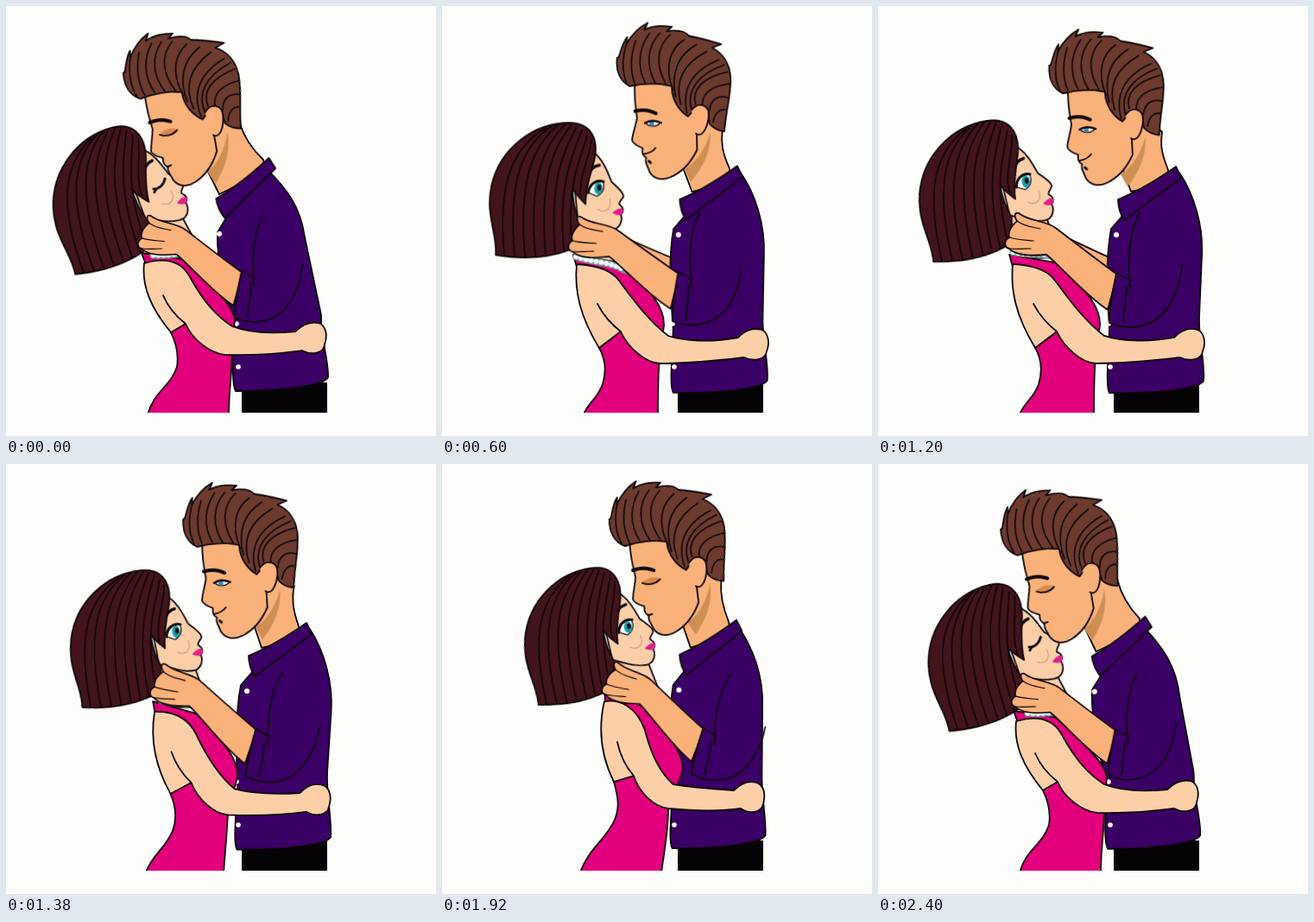
Animation of 498 by 498 pixels, one loop 2460 ms. Source, as an HTML page without scripts:

```html
<!DOCTYPE html>
<html lang="en">
<head>
<meta charset="utf-8">
<title>Kiss</title>
<style>
html, body { margin: 0; width: 100%; height: 100%; overflow: hidden; background: #fdfefc; }
svg { display: block; width: 100vw; height: 100vh; }
path { fill: none; stroke: #0c0508; stroke-width: 1.8; stroke-linejoin: round; stroke-linecap: round; }

.skin { fill: #fab17a; }
.fair { fill: #fccfa9; }
.purple { fill: #3b0066; }
.pink { fill: #e2007d; }
.brown { fill: #6c3a2f; }
.plum { fill: #42141b; }
.white { fill: #fff; }
.flat { stroke: none; }
.thin { stroke-width: 1.2; }
.strand { stroke-width: 1.6; }
.bold { stroke-width: 4; }

.him, .her, .arm, .neck, .collar, .shirt, .dress, .hug, .far, .awake, .asleep {
  animation: 2460ms linear infinite;
}
.him { animation-name: him; transform-origin: 302px 135px; }
.her { animation-name: her; transform-origin: 160px 220px; }
.arm { animation-name: arm; transform-origin: 271px 338px; }
.collar { animation-name: collar; transform-origin: 315px 210px; }
.neck { animation-name: neck; }
.shirt { animation-name: shirt; }
.dress { animation-name: dress; }
.hug { animation-name: hug; }
.far { animation-name: far; }
.him .awake { animation-name: his-awake; }
.him .asleep { animation-name: his-asleep; }
.her .awake { animation-name: her-awake; }
.her .asleep { animation-name: her-asleep; }
.awake, .asleep, .far { animation-timing-function: step-end; }

@keyframes him {
  0%, 100% { transform: translate(-61px, -2px) rotate(-10deg); }
  14.63% { transform: translate(-16px, -1px) rotate(-3deg); }
  21.95% { transform: translate(-5px, -4px) rotate(-1deg); }
  36.59% { transform: translate(0, 0); }
  48.78% { transform: translate(-6px, 2px) rotate(-3deg); }
  63.41% { transform: translate(9px, -10px) rotate(-4deg); }
  67% { transform: translate(8px, -13px) rotate(-4deg); }
  78.05% { transform: translate(-6px, -10px) rotate(-7deg); }
  97.56% { transform: translate(-55px, -3px) rotate(-9.5deg); }
}
@keyframes her {
  0%, 100% { transform: translate(0, 2px) rotate(-15deg); }
  14.63% { transform: translate(4px, 6px); }
  36.59% { transform: translate(0, 0); }
  45.12% { transform: translate(-18px, 0) rotate(-8deg); }
  48.78% { transform: translate(-6px, -2px) rotate(-8deg); }
  63.41% { transform: translate(45px, -22px) rotate(-4deg) scale(.97); }
  78.05% { transform: translate(39px, -17px) rotate(-8deg) scale(.97); }
  97.56% { transform: translate(4px, 2px) rotate(-14deg); }
}
@keyframes arm {
  0%, 100% { transform: translate(-3px, -4px) scale(.93); }
  14.63% { transform: translate(-3px, -2px) rotate(-3deg) scale(.96); }
  36.59%, 48.78% { transform: translate(0, 0); }
  63.41% { transform: translate(23px, -8px) rotate(8deg) scale(.94); }
  78.05% { transform: translate(24px, -6px) rotate(6deg) scale(.94); }
  97.56% { transform: translate(-1px, -4px) scale(.93); }
}
@keyframes collar {
  0% { transform: translate(-37px, -6px) rotate(-8deg); animation-timing-function: ease; }
  36.59%, 48.78% { transform: translate(0, 0); }
  63.41% { transform: translate(6px, -4px); animation-timing-function: ease-in; }
  100% { transform: translate(-37px, -6px) rotate(-8deg); }
}
@keyframes neck {
  0% {
    d: path("M232 188L247 218L300 192L298 178C285 166 275 150 270 134L240 120Z");
    animation-timing-function: ease;
  }
  36.59%, 48.78% { d: path("M282 185L293 215L340 205L335 187C328 170 327 160 329 146L300 120Z"); }
  63.41% {
    d: path("M289 178L299 211L346 200L341 183C336 165 335 152 338 136L309 112Z");
    animation-timing-function: ease-in;
  }
  100% { d: path("M232 188L247 218L300 192L298 178C285 166 275 150 270 134L240 120Z"); }
}
@keyframes shirt {
  0% {
    d: path("M303 190C325 212 341 232 346 268L365 358C364 385 374 410 373 430C368 440 320 445 266 446C262 438 262 420 265 375C260 350 243 300 245 262L254 247Z");
    animation-timing-function: ease;
  }
  36.59%, 48.78% {
    d: path("M349 193C366 218 377 255 375 290L372 360C371 385 379 415 377 434C372 444 320 449 268 448C264 440 266 420 268 375C267 350 262 300 270 258L283 243Z");
  }
  63.41% {
    d: path("M354 188C370 213 381 250 378 285L372 355C371 382 376 410 375 430C370 440 320 445 267 445C263 438 265 420 268 375C268 350 266 295 274 254L287 239Z");
    animation-timing-function: ease-in;
  }
  100% {
    d: path("M303 190C325 212 341 232 346 268L365 358C364 385 374 410 373 430C368 440 320 445 266 446C262 438 262 420 265 375C260 350 243 300 245 262L254 247Z");
  }
}
@keyframes dress {
  0%, 97.56%, 100% {
    d: path("M191 378C198 392 200 405 198 418C190 442 172 445 164 473L258 473C258 445 262 425 262 400L265 362C262 345 238 325 210 294L157 286Z");
  }
  14.63%, 48.78% {
    d: path("M182 396C190 410 190 425 186 438C180 455 170 458 164 473L250 473C250 445 250 430 252 405L257 370C258 345 235 325 210 298L152 288Z");
  }
  63.41%, 78.05% {
    d: path("M199 368C204 385 206 398 200 412C190 435 170 445 160 473L254 473C258 445 262 425 262 400L279 355C280 330 258 312 236 282L188 262Z");
  }
}
@keyframes hug {
  0%, 97.56%, 100% {
    d: path("M160 298C157 325 168 350 191 378L208 368C215 385 235 402 254 404C290 405 320 402 343 399C354 405 368 402 369 392C373 380 370 370 362 367C352 365 342 370 335 377C305 380 280 378 262 371C245 360 230 345 212 312C200 292 180 292 160 298M182 335Q190 354 208 368");
  }
  14.63%, 48.78% {
    d: path("M156 299C153 330 160 360 182 396L207 377C215 395 235 413 252 414C290 414 325 410 350 407C360 412 375 410 376 400C380 390 378 378 370 375C360 372 350 376 343 384C310 390 280 388 262 382C240 365 225 345 205 318C195 304 175 300 156 299M180 345Q190 364 207 377");
  }
  63.41%, 78.05% {
    d: path("M188 275C180 310 185 340 199 368L222 361C228 380 245 397 262 399C295 402 325 402 346 399C356 406 370 404 372 394C375 382 373 372 364 369C354 366 346 370 338 378C310 376 285 374 268 371C255 360 243 340 235 308C225 280 205 272 188 275M203 322Q208 345 222 361");
  }
}
@keyframes far { 0%, 56% { opacity: 0; } 8% { opacity: 1; } }
@keyframes his-awake { 0%, 71% { opacity: 0; } 8% { opacity: 1; } }
@keyframes his-asleep { 0%, 71% { opacity: 1; } 8% { opacity: 0; } }
@keyframes her-awake { 0%, 86% { opacity: 0; } 22% { opacity: 1; } }
@keyframes her-asleep { 0%, 86% { opacity: 1; } 22% { opacity: 0; } }
</style>
</head>
<body>
<svg viewBox="0 0 498 498">
  <!-- necks and far arm -->
  <path class="skin neck"/>
  <g class="him">
    <path class="flat" style="fill:#cd8f52" d="M284 192C298 184 308 170 315 150C315 172 306 190 291 207Z"/>
  </g>
  <g class="arm">
    <path class="skin far" d="M205 262C228 272 250 284 275 294V310C250 300 225 288 205 280Z"/>
  </g>
  <g class="her"><path class="fair" d="M152 235L156 295L208 300L196 250Z"/></g>

  <!-- his clothes -->
  <path class="flat" style="fill:#050305" d="M273 436H372V471H273Z"/>
  <path class="purple shirt"/>
  <g class="collar">
    <path class="purple" d="M278 224C300 215 325 200 345 186L351 199L285 248C280 240 278 232 278 224Z"/>
    <circle class="white" cx="276" cy="265" r="3"/>
  </g>
  <circle class="white" cx="267" cy="368" r="2.8"/>
  <circle class="white" cx="269" cy="418" r="2.8"/>

  <!-- her body -->
  <path class="pink dress"/>
  <g class="her">
    <path style="stroke:#6f9692;stroke-width:8" d="M153 287C172 294 192 292 210 303"/>
    <path style="stroke:#eef8f4;stroke-width:6;stroke-dasharray:0 6" d="M153 287C172 294 192 292 210 303"/>
  </g>
  <path class="fair hug"/>
  <rect y="471" width="498" height="27" fill="#fdfefc"/>

  <!-- her head -->
  <g class="her">
    <path class="fair" d="M150 190L172 165C184 173 190 190 194 200C200 206 208 212 208 217C207 221 203 222 203 226C208 230 209 235 205 238C207 244 205 252 198 255C185 258 170 250 155 244Z"/>
    <path class="thin" style="stroke:#d99a80" d="M178 232C188 238 195 230 192 220"/>
    <path class="flat" style="fill:#e0208c" d="M195 236C200 232 205 229 208 233C208 239 202 241 195 236Z"/>
    <path style="stroke-width:3.4" d="M167 191C170 185 174 182 180 181"/>
    <g class="awake">
      <path class="white thin" d="M168 213C169 205 175 199 184 200C187 207 184 214 177 217Z"/>
      <ellipse cx="179" cy="208" rx="4.8" ry="7" fill="#16a0aa"/>
      <ellipse cx="180" cy="207" rx="2.2" ry="3.4"/>
      <path style="stroke-width:2.8" d="M167 213C168 204 175 197 185 200"/>
    </g>
    <path class="asleep" style="stroke-width:2.8" d="M173 213C180 215 186 211 189 205M176 214L173 217"/>
    <path class="plum" d="M145 132C170 132 180 150 174 176C170 190 164 208 164 226C160 222 152 215 149 207C149 220 152 235 157 247C156 260 152 270 146 279C120 289 90 290 60 285C62 260 48 240 55 205C65 160 105 132 145 132Z"/>
    <path class="strand" d="M118 138C80 160 62 200 70 286M126 135C90 158 74 200 82 287M134 133C102 158 86 200 94 287M141 133C114 160 98 200 106 287M148 134C126 160 110 200 118 286M154 136C138 165 122 200 129 284M160 140C148 170 132 205 139 281M166 146C158 175 142 200 148 272M171 152C167 178 156 195 158 218"/>
  </g>

  <!-- his near arm -->
  <g class="arm">
    <path class="skin" d="M277 311C255 295 225 272 207 258C195 248 175 250 163 240C158 238 157 244 161 249C154 255 150 262 152 268C145 272 146 280 152 281C158 288 175 290 195 288C215 305 240 335 266 352Z"/>
    <path class="thin" d="M161 249C170 256 180 256 188 258M152 268C162 271 172 271 180 272M152 281C162 282 170 281 177 281"/>
    <path class="purple flat" d="M276 309L293 312L345 300L340 340C320 372 295 378 268 367C267 350 272 330 276 309Z"/>
    <path d="M292 328C288 290 291 262 303 240M293 318L276 309C272 330 267 350 268 367C295 378 325 372 341 340C347 328 351 312 352 300M288 324C288 340 284 355 284 366"/>
  </g>

  <!-- his head -->
  <g class="him">
    <path class="skin flat" d="M228 92C227 110 229 124 230 132C228 143 224 152 224 158C226 163 232 165 236 167C235 172 236 176 240 178C238 183 241 187 242 190C245 202 256 206 268 201C280 196 290 188 300 172L318 145L312 110L270 88Z"/>
    <path d="M228 92C227 110 229 124 230 132C228 143 224 152 224 158C226 163 232 165 236 167C235 172 236 176 240 178C238 183 241 187 242 190C245 202 256 206 268 201C280 196 290 188 299 170V152"/>
    <path class="bold" d="M228 124C236 122 245 123 252 127"/>
    <g class="awake">
      <path class="white thin" d="M240 138C246 135 252 136 257 138C252 143 245 143 240 138Z"/>
      <circle cx="247" cy="139" r="2.8" fill="#3f83b5"/>
      <path style="stroke-width:2.2" d="M239 138C245 134 252 135 258 138"/>
      <path d="M237 174C243 173 248 171 251 167"/>
      <path style="stroke-width:3" d="M243 182L245 184"/>
    </g>
    <g class="asleep">
      <path class="flat" style="fill:#d58a4c" d="M237 139C244 134 252 134 258 137C252 144 243 144 237 139Z"/>
      <path d="M237 140C244 144 252 143 258 138M239 178L244 177"/>
    </g>
    <path class="brown" d="M222 95C211 89 206 77 208 62C211 64 212 48 220 38L219 46C226 34 236 26 244 22L240 30C252 24 264 26 272 27L266 32C280 30 288 33 292 38C304 40 316 44 329 48L318 52C330 58 338 70 339 86C340 105 333 125 331 149C324 148 318 145 314 140C312 122 300 116 294 126L289 131C280 125 270 112 271 96C255 91 238 92 222 95Z"/>
    <path class="strand" d="M219 92C213 78 214 62 219 46M228 92C222 75 224 58 230 42M240 91C230 70 234 50 246 34M252 92C240 70 244 48 258 34M264 93C252 70 254 50 270 36M272 100C262 72 270 52 286 42M275 108C270 80 278 60 300 48M281 117C274 90 284 70 312 56M288 127C282 100 294 78 326 66M293 122C288 100 302 82 332 72M298 117C294 100 306 86 336 80M306 118C306 104 318 96 338 94M314 124C316 112 324 106 336 110M318 138C320 128 326 122 333 124"/>
    <path class="skin" d="M293 124C302 113 315 118 313 132C311 147 304 156 298 151"/>
  </g>
</svg>
</body>
</html>
```
